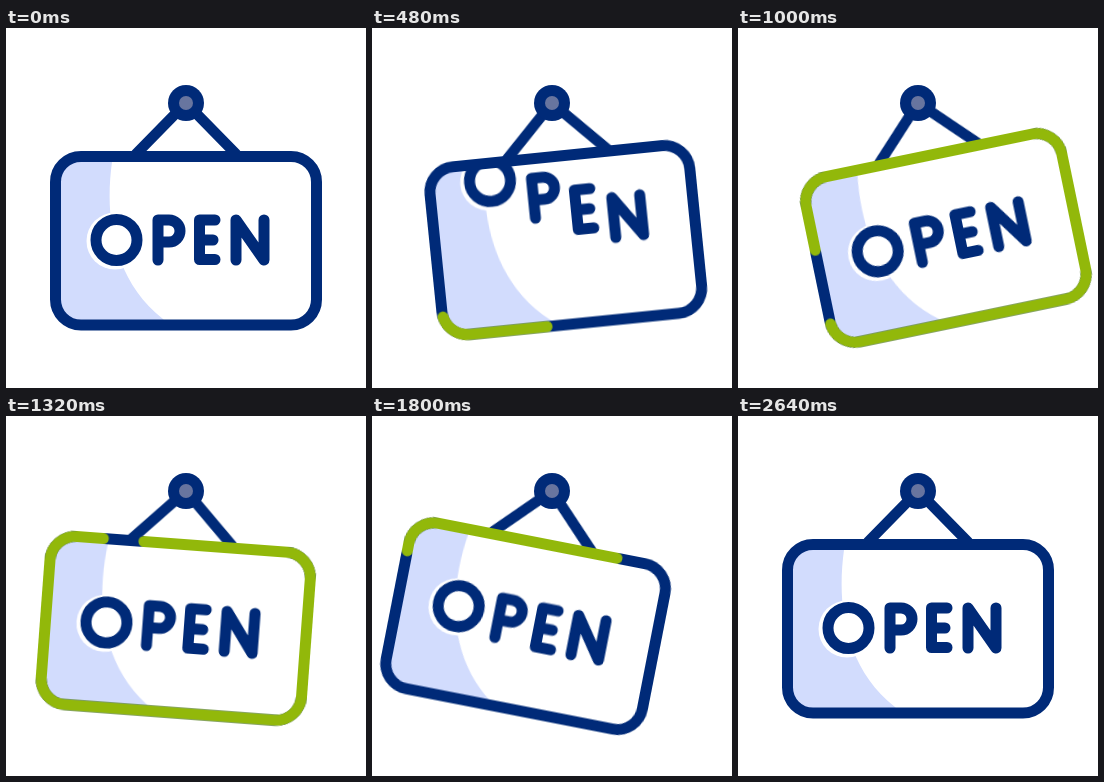
An HTML page that plays this animation: 360 px wide and 360 px high, repeating every 3000 ms.

```html
<!DOCTYPE html>
<html lang="en">
<head>
<meta charset="utf-8">
<title>Open sign</title>
<style>
  @property --head { syntax: "<number>"; inherits: false; initial-value: 0; }
  @property --tail { syntax: "<number>"; inherits: false; initial-value: 0; }
  @property --shift { syntax: "<number>"; inherits: false; initial-value: 351; }

  html, body { margin: 0; width: 100%; height: 100%; overflow: hidden; background: #fff; }
  svg { display: block; width: 100%; height: 100%; }

  .line { fill: none; stroke: #002a78; stroke-width: 11; stroke-linecap: round; stroke-linejoin: round; }
  .string { stroke-width: 10.5; }

  .sign { transform-origin: 180px 75px; animation: swing 3s infinite; }
  @keyframes swing {
    0% { transform: rotate(0); animation-timing-function: cubic-bezier(.77, 0, .38, 1); }
    29.333% { transform: rotate(-12.3deg); animation-timing-function: cubic-bezier(.61, 0, .31, 1); }
    56% { transform: rotate(11.2deg); animation-timing-function: cubic-bezier(.71, 0, .1, 1); }
    88%, 100% { transform: rotate(0); }
  }

  /* Each letter rolls up twice; its copies below take its place. */
  .roll { animation: roll 3s calc(var(--i) * 42ms) infinite; }
  @keyframes roll {
    0%, 5.6% { transform: translateY(0); animation-timing-function: cubic-bezier(.6, 0, .4, 1); }
    28.8% { transform: translateY(-174px); }
    56% { transform: translateY(-174px); animation-timing-function: cubic-bezier(.6, 0, .4, 1); }
    79.2%, 100% { transform: translateY(-348px); }
  }

  .halo { fill: #fff; animation: halo 3s step-end infinite; }
  @keyframes halo {
    0%, 40% { opacity: 1; }
    24% { opacity: 0; }
  }

  .trim {
    stroke: #92b80a;
    stroke-dasharray: calc((var(--head) - var(--tail)) * 1px) calc((815 - var(--head) + var(--tail)) * 1px);
    stroke-dashoffset: calc((var(--shift) + var(--tail)) * -1px);
    animation: head 3s infinite, tail 3s infinite, shift 3s infinite, show 3s step-end infinite;
  }
  @keyframes head {
    0%, 4% { --head: 0; animation-timing-function: cubic-bezier(.58, 0, .4, 1); }
    44%, 100% { --head: 815; }
  }
  @keyframes tail {
    0%, 36% { --tail: 0; animation-timing-function: cubic-bezier(.58, 0, .4, 1); }
    76.667%, 100% { --tail: 815; }
  }
  @keyframes shift {
    0% { --shift: 351; animation-timing-function: cubic-bezier(.333, .401, .667, .735); }
    88%, 100% { --shift: 1240; }
  }
  @keyframes show {
    0%, 76.667%, 100% { visibility: hidden; }
    4.2% { visibility: visible; }
  }
</style>
</head>
<body>
<svg viewBox="0 0 360 360" role="img" aria-label="Open sign">
  <defs>
    <rect id="board" x="49.5" y="128.5" width="261" height="168.5" rx="25.5" pathLength="815"/>
    <clipPath id="inside"><use href="#board"/></clipPath>
    <g id="O"><circle class="halo" cx="109" cy="213" r="28.5"/><circle class="line" cx="110.5" cy="212" r="20.5"/></g>
    <path id="P" class="line" d="M152 232V192H163a11 11 0 0 1 0 22H152"/>
    <path id="E" class="line" d="M209 192H193.5V231.5H209M193.5 212H207"/>
    <path id="N" class="line" d="M230 232V192L258 232V192"/>
  </defs>
  <g class="sign">
    <path class="line string" d="M130 126L180 75L230 126"/>
    <use href="#board" fill="#fff"/>
    <g clip-path="url(#inside)">
      <path fill="#d2dcfd" d="M40 120H108L106 134C99 185 105 250 157 291L165 300H40Z"/>
      <g id="word"></g>
    </g>
    <use href="#board" class="line"/>
    <rect class="line trim" x="49.5" y="128.5" width="261" height="168.5" rx="25.5" pathLength="815"/>
  </g>
  <circle cx="180" cy="75" r="18" fill="#002a78"/>
  <circle cx="180" cy="75" r="7" fill="#68759f"/>
</svg>
<script>
  const copies = id => [0, 174, 348].map(y => `<use href="#${id}" y="${y}"/>`).join("");
  document.getElementById("word").innerHTML = [..."OPEN"]
    .map((id, i) => `<g class="roll" style="--i:${i}">${copies(id)}</g>`).join("");
</script>
</body>
</html>
```
